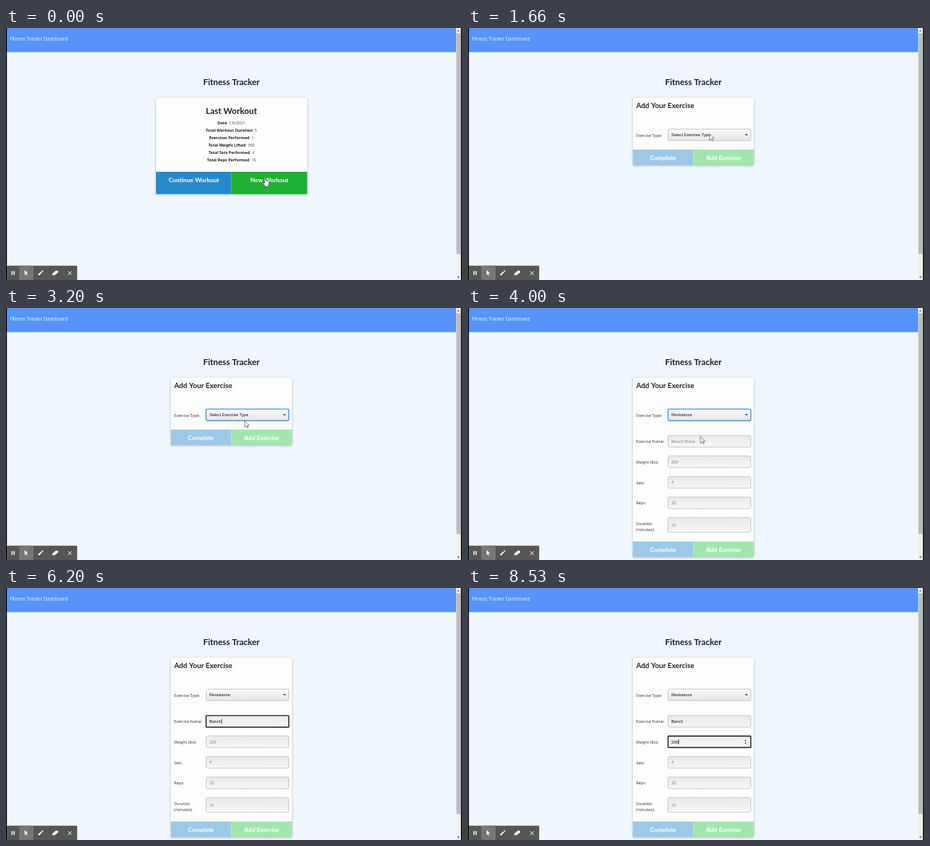
Animation, 614 px wide and 340 px high, one loop 8.6 s. Source, as an HTML page with a canvas:

```html
<!DOCTYPE html>
<html lang="en">
<head>
<meta charset="utf-8">
<title>Fitness Tracker</title>
<style>
html, body { margin: 0; width: 100%; height: 100%; overflow: hidden; background: #eff6fe; }
canvas { display: block; }
</style>
</head>
<body>
<canvas id="stage" width="614" height="340"></canvas>
<script>
const ctx = document.getElementById('stage').getContext('2d');
const LOOP = 8600;
const BODY = '5.35px "Open Sans", sans-serif';
const BOLD = 'bold 5.35px "Open Sans", sans-serif';
const INPUT = '5.65px "Liberation Sans", Arial, sans-serif';
const lato = size => `bold ${size}px Lato, sans-serif`;

// Moments of the story, in ms
const T = { form: 480, plain: 1960, styled: 2900, pick: 3780, focusName: 4690, focusWeight: 7100 };
const nameKeys = [5350, 5520, 5690, 5850, 6020];
const weightKeys = [7700, 7930, 8120];
const path = [
  [0, 348, 202], [480, 348, 202], [800, 341.7, 120], [1150, 338, 124],
  [1700, 325, 143], [2460, 323, 149], [3000, 323, 148], [3700, 315, 168],
  [4000, 313, 173.5], [4650, 319, 178]
];

function rect(x, y, w, h, color) {
  ctx.fillStyle = color;
  ctx.fillRect(x, y, w, h);
}

function text(s, x, y, font, color, align = 'left') {
  ctx.font = font;
  ctx.fillStyle = color;
  ctx.textAlign = align;
  ctx.fillText(s, x, y);
}

function shape(points, fill, stroke, width = 0.7) {
  ctx.beginPath();
  points.forEach(([x, y]) => ctx.lineTo(x, y));
  ctx.closePath();
  if (fill) { ctx.fillStyle = fill; ctx.fill(); }
  if (stroke) { ctx.strokeStyle = stroke; ctx.lineWidth = width; ctx.stroke(); }
}

function line(x1, y1, x2, y2, color, width) {
  ctx.beginPath();
  ctx.moveTo(x1, y1);
  ctx.lineTo(x2, y2);
  ctx.strokeStyle = color;
  ctx.lineWidth = width;
  ctx.stroke();
}

function triangle(x, y, w, h, color) {
  shape([[x - w / 2, y], [x + w / 2, y], [x, y + h]], color);
}

function at(x, y, draw) {
  ctx.save();
  ctx.translate(x, y);
  draw();
  ctx.restore();
}

function frame() {
  rect(0, 0, 614, 340, '#eff6fe');
  rect(1, 0, 605, 32.6, '#5793f8');
  text('Fitness Tracker Dashboard', 5.2, 17.2, '6.35px "Open Sans", sans-serif', '#f5f9ff');
  text('Fitness Tracker', 303.5, 76.8, lato(11.4), '#202327', 'center');
  rect(606, 0, 6.5, 340, '#f0f0f0');
  rect(606.4, 7, 5.7, 298, '#bdbdbd');
  triangle(609.2, 4.4, 3.2, -2, '#555');
  triangle(609.2, 335.5, 3.2, 2, '#333');
  rect(612.6, 0, 1.4, 340, '#000');
  rect(0, 0, 1.2, 340, '#000');
}

function card(x, y, w, h, shadow = true) {
  ctx.save();
  if (shadow) {
    ctx.shadowColor = 'rgba(34,36,38,.32)';
    ctx.shadowBlur = 3;
    ctx.shadowOffsetY = 0.8;
  }
  ctx.beginPath();
  ctx.roundRect(x, y, w, h, 1.5);
  ctx.fillStyle = '#fcfdfd';
  ctx.fill();
  ctx.restore();
}

function buttons(x, y, w, h, labels, colors, baseline, ink = '#fff') {
  labels.forEach((label, i) => {
    const left = x + i * w / 2;
    if (colors) rect(left, y, w / 2, h, colors[i]);
    text(label, left + w / 4, baseline, lato(8.2), ink, 'center');
  });
}

function summary() {
  card(202, 94, 203.5, 130);
  text('Last Workout', 303.5, 115.5, lato(11.4), '#202327', 'center');
  const rows = [
    ['Date', '1/6/2021'], ['Total Workout Duration', '5'], ['Exercises Performed', '1'],
    ['Total Weight Lifted', '300'], ['Total Sets Performed', '4'], ['Total Reps Performed', '10']
  ];
  rows.forEach(([label, value], i) => {
    const y = 130.4 + i * 9.9, tail = ': ' + value;
    ctx.font = BOLD;
    const a = ctx.measureText(label).width;
    ctx.font = BODY;
    const x = 303.5 - (a + ctx.measureText(tail).width) / 2;
    text(label, x, y, BOLD, '#222');
    text(tail, x + a, y, BODY, '#444');
  });
  buttons(202, 194, 203.5, 30, ['Continue Workout', 'New Workout'], ['#278acd', '#1fb035'], 207.5);
}

function field(y, h, value, { color = '#858585', focus = '', select = false, caret = -1 } = {}) {
  const g = ctx.createLinearGradient(0, y, 0, y + h);
  g.addColorStop(0, select ? '#fbfbfb' : '#e9e9e9');
  g.addColorStop(1, select ? '#e5e5e5' : '#f7f7f7');
  ctx.beginPath();
  ctx.roundRect(269.4, y + 0.4, 111.4, h - 0.8, focus === '#222' ? 0.8 : 2);
  ctx.fillStyle = g;
  ctx.fill();
  ctx.strokeStyle = focus || '#bcbcbc';
  ctx.lineWidth = focus ? 1.4 : 0.8;
  ctx.stroke();
  const mid = y + h / 2;
  text(value, 273.7, mid + 2, INPUT, color);
  if (select) triangle(375, mid - 1.2, 4.4, 2.6, '#2675ad');
  if (caret >= 0) {
    ctx.font = INPUT;
    const x = 274 + ctx.measureText(value.slice(0, caret)).width;
    rect(x, mid - 3.2, 0.7, 6.4, '#111');
  }
}

const typed = (word, keys, t) => word.slice(0, keys.filter(k => t >= k).length);

// The caret restarts its blink at every key press.
function caretOn(t, start, keys) {
  const last = Math.max(start, ...keys.filter(k => t >= k));
  return Math.floor((t - last) / 530) % 2 === 0;
}

function textField(y, word, hint, keys, start, end, t) {
  const value = typed(word, keys, t);
  const active = t >= start && t < end;
  field(y, 16.4, value || hint, {
    color: value ? '#111' : '#858585',
    focus: active ? '#222' : '',
    caret: active && caretOn(t, start, keys) ? value.length : -1
  });
  return active;
}

function form(t) {
  const full = t >= T.pick;
  const plain = t >= T.plain && t < T.styled;
  const bottom = full ? 336 : 185;
  card(222, 94, 163, bottom - 94, !plain);
  text('Add Your Exercise', 226.4, 107.7, lato(9.75), '#202327');
  text('Exercise Type:', 226.3, 146.6, BODY, '#333');
  field(136, 16.4, full ? 'Resistance' : 'Select Exercise Type', {
    color: '#111', select: true,
    focus: t >= T.styled && t < T.focusName ? '#5196e2' : ''
  });
  buttons(222, bottom - 21, 163, 21, ['Complete', 'Add Exercise'],
    plain ? null : ['#9ec9e6', '#a1e6ae'], bottom - 7.2, plain ? '#bcbcbc' : '#fff');
  if (!full) return;

  const labels = [['Exercise Name:', 182.4], ['Weight (lbs):', 210], ['Sets:', 237.8],
    ['Reps:', 265.4], ['Duration', 293], ['(minutes):', 300.5]];
  labels.forEach(([label, y]) => text(label, 226.3, y, BODY, '#333'));
  textField(171.7, 'Bench', 'Bench Press', nameKeys, T.focusName, T.focusWeight, t);
  if (textField(199.3, '200', '200', weightKeys, T.focusWeight, LOOP, t)) {
    triangle(373.6, 206.5, 2.8, -1.9, '#444');
    triangle(373.6, 208.7, 2.8, 1.9, '#444');
  }
  field(227, 16.4, '4');
  field(254.7, 16.4, '10');
  field(282.4, 20.6, '10');
}

function toolbar() {
  rect(1, 320.7, 94.8, 19.3, '#565656');
  rect(17.8, 320.7, 19.2, 19.3, '#767676');
  rect(7.3, 328, 1.5, 5.2, '#fff');
  rect(10.2, 328, 1.5, 5.2, '#fff');
  at(25, 326.6, () => shape(arrow.map(([x, y]) => [x * 0.75, y * 0.75]), '#f4f4f4'));
  line(43.7, 333.4, 48, 329.1, '#fff', 2);
  line(48.6, 328.5, 49.6, 327.5, '#fff', 2);
  shape([[62.4, 331.2], [67, 327.6], [70.2, 327.6], [70.2, 329.8], [65.6, 333.6], [62.4, 333.6]], '#fff');
  line(83.5, 328.2, 88.5, 333.2, '#fff', 1);
  line(88.5, 328.2, 83.5, 333.2, '#fff', 1);
}

const arrow = [[0, 0], [0, 8.7], [2, 6.9], [3.4, 9.9], [4.8, 9.2], [3.4, 6.3], [6.2, 6.2]];
const hand = [[0, 0.7], [0.8, 0], [1.7, 0.7], [1.9, 4], [3.2, 3.9], [4.4, 4.5], [5.6, 5.2],
  [6.1, 6.2], [5.9, 9], [5, 12], [1.3, 12], [-0.2, 9.7], [-2, 7.3], [-1.2, 6.5], [0.2, 7.6]];

function position(t) {
  const i = path.findIndex(p => p[0] > t);
  if (i < 0) return path[path.length - 1].slice(1);
  const [t0, x0, y0] = path[i - 1], [t1, x1, y1] = path[i];
  const u = (t - t0) / (t1 - t0), e = u * u * (3 - 2 * u);
  return [x0 + (x1 - x0) * e, y0 + (y1 - y0) * e];
}

function pointer(t) {
  if (t < T.focusName) {
    const [x, y] = position(t);
    at(x, y, () => t < T.form ? shape(hand, '#fff', '#333', 0.6) : shape(arrow, '#fff', '#555', 0.7));
  } else if (t < 4930) {
    ctx.beginPath();
    ctx.arc(319.3, 178.7, 2, 0, Math.PI * 2);
    ctx.strokeStyle = '#e59a9a';
    ctx.lineWidth = 0.8;
    ctx.stroke();
  }
}

function render(now) {
  const t = now % LOOP;
  frame();
  if (t < T.form) summary();
  else form(t);
  toolbar();
  pointer(t);
  requestAnimationFrame(() => render(performance.now()));
}
render(0);
</script>
</body>
</html>
```
